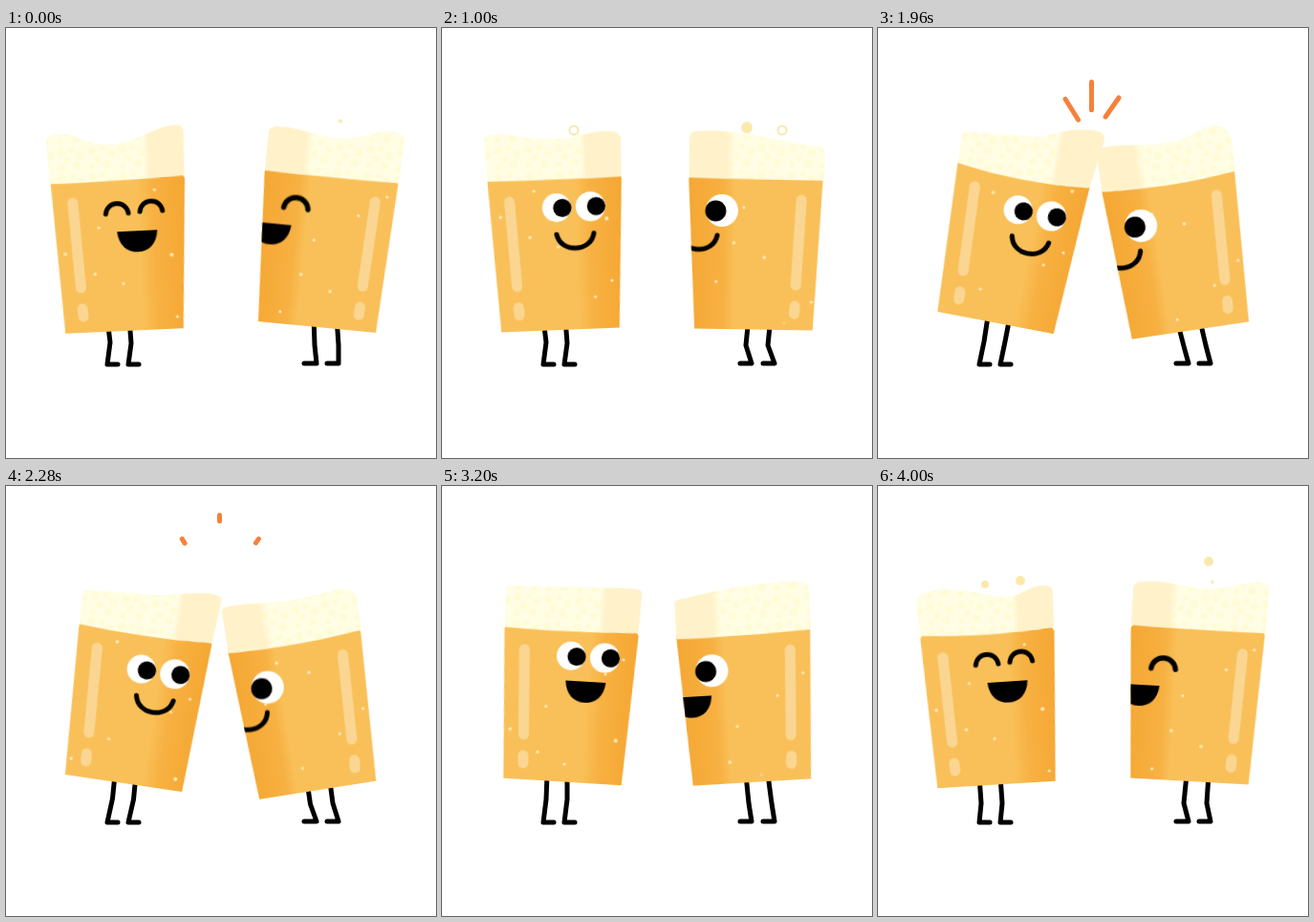
Animation, 450 px wide and 450 px high, one loop 4040 ms. Source, as an HTML page without scripts:

```html
<!DOCTYPE html>
<html lang="en">
<head>
<meta charset="utf-8">
<title>Cheers</title>
<style>
html, body { margin: 0; width: 100%; height: 100%; overflow: hidden; background: #fff; }
svg { display: block; width: 100vw; height: 100vh; }
.anim, .foam, .legs, .bub, .float, .last, .clink path { animation: 4.04s ease-in-out infinite; }
.legs, .arc, .smile { fill: none; stroke: #000; stroke-width: 5; stroke-linecap: round; stroke-linejoin: round; }
.shine { fill: none; stroke: #fad692; stroke-width: 11; stroke-linecap: round; }
.white { fill: #fff; }

/* body sway, pivot at the bottom centre */
#glassL { animation-name: swayL; }
@keyframes swayL {
  0% { transform: translate(124px, 317px) rotate(-2.6deg); }
  4.95% { transform: translate(124px, 313px) rotate(-4.8deg); }
  9.9% { transform: translate(124px, 316px) rotate(-2.4deg); }
  13.86% { transform: translate(124px, 315.5px) rotate(-3deg); }
  17.82% { transform: translate(124px, 313px) rotate(-4.2deg); }
  24.75% { transform: translate(124px, 316px) rotate(-2.3deg); }
  28.71% { transform: translate(124px, 316px) rotate(-2.4deg); }
  41.58% { transform: translate(124px, 316px) rotate(-10.8deg); }
  42.57% { transform: translate(124px, 316px) rotate(-10.5deg); }
  46.53% { transform: translate(123px, 308px) rotate(11.4deg); }
  48.51% { transform: translate(123px, 308.5px) rotate(10.8deg); }
  56.44% { transform: translate(123px, 311px) rotate(8.4deg); }
  64.36% { transform: translate(123px, 312px) rotate(7.6deg); }
  70.3% { transform: translate(124px, 312px) rotate(6.8deg); }
  79.21% { transform: translate(126px, 309.5px) rotate(3.5deg); }
  84.16% { transform: translate(125px, 314px) rotate(-1deg); }
  88.12% { transform: translate(124px, 312px) rotate(-4.2deg); }
  92.57% { transform: translate(124px, 316px) rotate(-1.6deg); }
  99.01% { transform: translate(124px, 312.5px) rotate(-3.5deg); }
  100% { transform: translate(124px, 313px) rotate(-3.4deg); }
}
#glassR { animation-name: swayR; }
@keyframes swayR {
  0% { transform: translate(325.5px, 313px) rotate(5.5deg); }
  3.96% { transform: translate(325.5px, 313px) rotate(5.6deg); }
  8.91% { transform: translate(325.5px, 316px) rotate(2.4deg); }
  13.86% { transform: translate(326px, 316.5px) rotate(2.8deg); }
  17.82% { transform: translate(325.5px, 313px) rotate(5deg); }
  24.75% { transform: translate(326px, 315.5px) rotate(.9deg); }
  28.71% { transform: translate(326px, 316px) rotate(.8deg); }
  41.58% { transform: translate(325.5px, 314px) rotate(6.8deg); }
  42.57% { transform: translate(325.5px, 314px) rotate(6.6deg); }
  46.53% { transform: translate(326px, 316px) rotate(-9.2deg); }
  48.51% { transform: translate(327px, 316.5px) rotate(-8.5deg); }
  64.36% { transform: translate(325.5px, 320px) rotate(-9.4deg); }
  70.3% { transform: translate(325px, 317px) rotate(-8deg); }
  79.21% { transform: translate(324.5px, 310px) rotate(-3.4deg); }
  84.16% { transform: translate(325px, 314px) rotate(1deg); }
  88.12% { transform: translate(325.5px, 311px) rotate(4.6deg); }
  92.57% { transform: translate(325.5px, 315px) rotate(1.5deg); }
  99.01% { transform: translate(326px, 309px) rotate(3.2deg); }
  100% { transform: translate(326px, 309.5px) rotate(3.4deg); }
}

/* sloshing foam */
#glassL .foam { animation-name: foamL; }
@keyframes foamL {
  0% { d: path("M-71 -157L-73 -202Q-72 -209 -60 -209C-40 -209 -35 -197 -8 -196S35 -210 60 -213Q71 -214 71 -206L70 -160Q0 -156 -71 -157Z"); }
  13.86% { d: path("M-70 -158L-72 -197Q-72 -201 -60 -201C-40 -203 -30 -193 -10 -193S35 -204 62 -206Q71 -207 71 -203L70 -160Q0 -154 -70 -158Z"); }
  24.75% { d: path("M-70 -158L-72 -202Q-72 -207 -60 -207C-40 -207 -30 -200 0 -200S35 -207 58 -206Q71 -205 71 -198L70 -158Q0 -157 -70 -158Z"); }
  42.57% { d: path("M-70 -160L-72 -206Q-72 -210 -60 -210C-45 -210 -25 -204 0 -200S40 -194 62 -193Q71 -193 71 -190L70 -156Q0 -158 -70 -160Z"); }
  48.51% { d: path("M-70 -157L-71 -187Q-71 -191 -62 -191C-45 -193 -30 -197 -5 -198S28 -214 62 -217Q77 -218 76 -208L70 -157Q0 -148 -70 -157Z"); }
  64.36% { d: path("M-70 -159L-71 -195Q-71 -199 -62 -199C-40 -200 -20 -200 0 -200S40 -202 62 -202Q71 -202 71 -198L70 -160Q0 -158 -70 -159Z"); }
  79.21% { d: path("M-70 -158L-71 -198Q-71 -202 -62 -202C-40 -202 -20 -203 0 -204S40 -206 62 -206Q71 -206 71 -202L70 -160Q0 -156 -70 -158Z"); }
  99.01%, 100% { d: path("M-70 -160L-72 -194Q-72 -205 -60 -205C-45 -210 -25 -206 8 -198S40 -206 62 -205Q71 -204 71 -200L70 -161Q0 -154 -70 -160Z"); }
}
#glassR .foam { animation-name: foamR; }
@keyframes foamR {
  0% { d: path("M-70 -158L-70 -200Q-68 -205 -58 -205C-40 -207 -25 -199 3 -199S35 -210 58 -211Q73 -211 72 -203L71 -158Q0 -157 -70 -158Z"); }
  13.86% { d: path("M-70 -158L-70 -195Q-70 -200 -60 -200C-40 -201 -30 -200 -8 -200S30 -203 62 -193Q72 -191 72 -185L71 -157Q0 -150 -70 -158Z"); }
  24.75% { d: path("M-70 -158L-70 -201Q-70 -207 -58 -207C-40 -208 -20 -206 5 -202S40 -195 62 -193Q72 -192 72 -186L71 -157Q0 -157 -70 -158Z"); }
  42.57% { d: path("M-70 -156L-70 -191Q-70 -195 -60 -195C-40 -195 -20 -201 0 -203S40 -209 60 -209Q72 -209 72 -202L71 -160Q0 -158 -70 -156Z"); }
  48.51% { d: path("M-70 -157L-70 -199Q-70 -203 -60 -203C-40 -203 -20 -198 5 -198S40 -208 58 -209Q72 -204 72 -188L71 -158Q0 -150 -70 -157Z"); }
  64.36% { d: path("M-70 -155L-70 -202Q-70 -206 -60 -206C-40 -206 -20 -203 0 -203S40 -199 60 -199Q71 -199 71 -195L71 -159Q0 -153 -70 -155Z"); }
  79.21% { d: path("M-70 -154L-70 -190Q-70 -196 -60 -196C-40 -200 -20 -203 0 -205S40 -208 60 -207Q72 -205 71 -198L71 -156Q0 -153 -70 -154Z"); }
  99.01%, 100% { d: path("M-70 -160L-70 -198Q-70 -206 -58 -206C-40 -209 -20 -203 2 -202S40 -210 60 -212Q73 -213 72 -206L71 -159Q0 -158 -70 -160Z"); }
}

#legsL { animation-name: legsL; }
@keyframes legsL {
  0% { d: path("M106 304L109 329 106 352H117M129 304L131 330 128 352H139"); }
  13.86% { d: path("M106 304L108 332 106 352H117M128 304L129 332 128 352H139"); }
  24.75% { d: path("M106 304L109 329 106 352H117M129 304L131 330 128 352H139"); }
  42.57% { d: path("M99 304L104 332 106 352H117M122 304L126 332 128 352H139"); }
  48.51% { d: path("M115 302L111 328 106 352H117M138 302L133 328 128 352H139"); }
  64.36% { d: path("M113 302L112 326 106 352H117M134 302L134 328 128 352H139"); }
  79.21% { d: path("M110 302L109 328 106 352H117M131 302L131 328 128 352H139"); }
  99.01%, 100% { d: path("M106 304L108 332 106 352H117M128 304L130 332 128 352H139"); }
}
#legsR { animation-name: legsR; }
@keyframes legsR {
  0% { d: path("M322 302L323 332 325 351H312M346 302L348 332 348 351H336"); }
  13.86% { d: path("M321 302L318 332 324 351H312M344 302L341 332 348 351H336"); }
  24.75% { d: path("M321 302L318 332 324 351H312M344 302L341 332 348 351H336"); }
  42.57% { d: path("M328 302L325 332 325 351H312M350 302L348 332 348 351H336"); }
  48.51% { d: path("M312 302L320 333 325 351H312M336 302L343 332 348 351H336"); }
  64.36% { d: path("M316 302L317 333 325 351H312M340 302L341 332 348 351H336"); }
  79.21% { d: path("M318 302L321 332 324 351H312M341 302L345 332 348 351H336"); }
  99.01%, 100% { d: path("M323 302L320 332 325 351H312M346 302L344 332 348 351H336"); }
}

#faceL { animation-name: faceL; }
@keyframes faceL {
  0% { transform: translateY(-2px); }
  13.86% { transform: translateY(-3px); }
  24.75%, 42.57% { transform: translateY(0); }
  48.51% { transform: translateY(7.5px); }
  64.36% { transform: translateY(7px); }
  79.21% { transform: translateY(-4px); }
  99.01%, 100% { transform: translateY(-5px); }
}
#faceR { animation-name: faceR; }
@keyframes faceR {
  0% { transform: translateY(-5.5px); }
  13.86%, 42.57% { transform: translateY(0); }
  48.51% { transform: translateY(8px); }
  64.36% { transform: translateY(11px); }
  79.21% { transform: translateY(5px); }
  99.01%, 100% { transform: translateY(0); }
}

/* expressions swap without blending */
.anim.glad, .anim.look, .anim.open, .anim.calm { animation-timing-function: step-end; }
.glad { animation-name: glad; }
.look { animation-name: look; }
.open { animation-name: open; }
.calm { animation-name: calm; }
@keyframes glad { 0%, 84.16%, 100% { opacity: 1; } 18.81% { opacity: 0; } }
@keyframes look { 0%, 84.16%, 100% { opacity: 0; } 18.81% { opacity: 1; } }
@keyframes open { 0%, 72.28%, 100% { opacity: 1; } 18.81% { opacity: 0; } }
@keyframes calm { 0%, 72.28%, 100% { opacity: 0; } 18.81% { opacity: 1; } }

.bub { fill: #fee9b8; animation-name: rise; animation-timing-function: linear; animation-delay: var(--d); }
@keyframes rise {
  0% { transform: translateY(-5px); opacity: 0; }
  4%, 96% { opacity: 1; }
  100% { transform: translateY(-155px); opacity: 0; }
}
.float, .last { fill: #fbe9ac; stroke: #fbe9ac; stroke-width: 2; }
.float { animation-name: float; animation-timing-function: linear; animation-delay: var(--d); }
@keyframes float {
  0% { transform: translateY(24px) scale(.3); opacity: 1; }
  8% { transform: none; }
  10.5% { transform: translateY(-3px); fill-opacity: 1; }
  10.6% { fill-opacity: 0; }
  14% { transform: translateY(-3px); opacity: 1; fill-opacity: 0; }
  14.1%, 100% { transform: none; opacity: 0; fill-opacity: 0; }
}
.last { animation-name: last; }
@keyframes last {
  0%, 92% { transform: translateY(24px) scale(.3); opacity: 0; }
  92.1% { transform: translateY(24px) scale(.3); opacity: 1; }
  99.01%, 100% { transform: none; opacity: 1; }
}

.clink path { fill: none; stroke: #f5813c; stroke-width: 5; stroke-linecap: round; animation-name: clink; animation-timing-function: linear; }
@keyframes clink {
  0%, 45.5% { stroke-dasharray: 1 300; stroke-dashoffset: 0; opacity: 0; }
  45.6% { stroke-dasharray: 1 300; stroke-dashoffset: 0; opacity: 1; }
  48.51% { stroke-dasharray: 42 300; stroke-dashoffset: -20; }
  52.5% { stroke-dasharray: 35 300; stroke-dashoffset: -58; }
  56.9% { stroke-dasharray: 6 300; stroke-dashoffset: -94; opacity: 1; }
  57%, 100% { stroke-dasharray: 1 300; stroke-dashoffset: -99; opacity: 0; }
}
</style>
</head>
<body>
<svg viewBox="0 0 450 450">
  <defs>
    <linearGradient id="beerL" gradientUnits="userSpaceOnUse" x1="-70" x2="70">
      <stop offset=".64" stop-color="#f9c059"/><stop offset=".76" stop-color="#f7b142"/><stop offset="1" stop-color="#f5a733"/>
    </linearGradient>
    <linearGradient id="beerR" gradientUnits="userSpaceOnUse" x1="-70" x2="70">
      <stop offset="0" stop-color="#f5a733"/><stop offset=".27" stop-color="#f7b142"/><stop offset=".35" stop-color="#f9c059"/>
    </linearGradient>
    <linearGradient id="shadeL" gradientUnits="userSpaceOnUse" x1="-70" x2="70">
      <stop offset=".7" stop-color="#fff2ca" stop-opacity="0"/><stop offset=".74" stop-color="#fff2ca"/>
    </linearGradient>
    <linearGradient id="shadeR" gradientUnits="userSpaceOnUse" x1="-70" x2="70">
      <stop offset=".28" stop-color="#fff2ca"/><stop offset=".33" stop-color="#fff2ca" stop-opacity="0"/>
    </linearGradient>
    <pattern id="froth" width="32" height="28" patternUnits="userSpaceOnUse">
      <path fill="#fffde4" d="M0 0H32V28H0Z"/>
      <g fill="#fffbd6">
        <circle cx="6" cy="6" r="4"/><circle cx="17" cy="4" r="3"/><circle cx="26" cy="10" r="4"/>
        <circle cx="12" cy="15" r="3.5"/><circle cx="22" cy="21" r="4"/><circle cx="6" cy="23" r="3"/>
      </g>
    </pattern>
    <path id="cup" d="M-66 -164H66L70.2 -157L61.8 0H-61.8L-70.2 -157Z"/>
    <clipPath id="cupClip"><use href="#cup"/></clipPath>
    <path id="shine" class="shine" d="M-48 -136L-43.5 -47M-42.8 -25L-42.2 -17"/>
    <path id="mouth" d="M-21 0H21C20 14 12 22 0 22S-20 14 -21 0Z"/>
    <path id="smile" class="smile" d="M-19.5 0C-16 20 16 20 19.5 0"/>
    <path id="arc" class="arc" d="M-11.8 0C-10 -14 10 -14 11.8 0"/>
  </defs>

  <g id="floats">
    <g transform="translate(74 103)"><circle class="float" r="5" style="--d:-3.8s"/></g>
    <g transform="translate(112 108)"><circle class="float" r="3" style="--d:-3.8s"/></g>
    <g transform="translate(334 103)"><circle class="float" r="3.5" style="--d:-3.8s"/></g>
    <g transform="translate(350 78)"><circle class="float" r="4" style="--d:-4.1s"/></g>
    <g transform="translate(138 110)"><circle class="float" r="4.5" style="--d:-3.54s"/></g>
    <g transform="translate(319 104)"><circle class="float" r="5" style="--d:-3.36s"/></g>
    <g transform="translate(356 110)"><circle class="float" r="4.5" style="--d:-3.54s"/></g>
    <g transform="translate(338 66)"><circle class="float" r="4" style="--d:-.7s"/></g>
    <g transform="translate(112 103)"><circle class="last" r="3"/></g>
    <g transform="translate(149 99)"><circle class="last" r="4"/></g>
    <g transform="translate(346 79)"><circle class="last" r="4"/></g>
  </g>

  <path id="legsL" class="legs" d="M106 304L109 329 106 352H117M129 304L131 330 128 352H139"/>
  <path id="legsR" class="legs" d="M322 302L323 332 325 351H312M346 302L348 332 348 351H336"/>

  <g id="glassL" class="anim">
    <use href="#cup" fill="url(#beerL)"/>
    <use href="#shine"/>
    <circle class="bub" cx="-58" r="1.8" style="--d:-2.1s"/>
    <circle class="bub" cx="-28" r="1.8" style="--d:-1.5s"/>
    <circle class="bub" cx="1" r="1.6" style="--d:-1.2s"/>
    <circle class="bub" cx="53" r="2" style="--d:-1.95s"/>
    <circle class="bub" cx="56" r="1.6" style="--d:-.2s"/>
    <circle class="bub" cx="38" r="1.6" style="--d:-3.8s"/>
    <circle class="bub" cx="-22" r="1.6" style="--d:-2.8s"/>
    <path class="foam" fill="url(#froth)"/>
    <path class="foam" fill="url(#shadeL)"/>
    <g id="faceL" class="anim">
      <g class="anim glad">
        <use href="#arc" x="-2.2" y="-121"/><use href="#arc" x="33.6" y="-122"/>
      </g>
      <g class="anim look">
        <circle class="white" cx="1" cy="-128" r="15"/><circle class="white" cx="36.5" cy="-128" r="15.5"/>
        <circle cx="7" cy="-127.5" r="9.6"/><circle cx="42.5" cy="-128" r="9.6"/>
      </g>
      <use class="anim open" href="#mouth" x="18" y="-102"/>
      <use class="anim calm" href="#smile" x="19.5" y="-100"/>
    </g>
  </g>

  <g id="glassR" class="anim">
    <use href="#cup" fill="url(#beerR)"/>
    <use href="#shine" transform="scale(-1 1)"/>
    <circle class="bub" cx="-22" r="1.8" style="--d:-1.3s"/>
    <circle class="bub" cx="10" r="1.8" style="--d:-.9s"/>
    <circle class="bub" cx="-12" r="1.6" style="--d:-2.3s"/>
    <circle class="bub" cx="-40" r="1.6" style="--d:-.2s"/>
    <circle class="bub" cx="32" r="1.6" style="--d:-3.1s"/>
    <circle class="bub" cx="60" r="1.6" style="--d:-3.7s"/>
    <path class="foam" fill="url(#froth)"/>
    <path class="foam" fill="url(#shadeR)"/>
    <g clip-path="url(#cupClip)">
      <g id="faceR" class="anim">
        <use class="anim glad" href="#arc" transform="translate(-34 -116) scale(1.08)"/>
        <g class="anim look">
          <circle class="white" cx="-35" cy="-124" r="17"/><circle cx="-41.5" cy="-123.5" r="11"/>
        </g>
        <use class="anim open" href="#mouth" x="-58" y="-98"/>
        <use class="anim calm" href="#smile" x="-59" y="-98"/>
      </g>
    </g>
  </g>

  <g class="clink">
    <path pathLength="100" d="M216 106.5L184 55"/>
    <path pathLength="100" d="M223.5 100V30"/>
    <path pathLength="100" d="M231.3 102.6L264.6 55"/>
  </g>
</svg>
</body>
</html>
```
